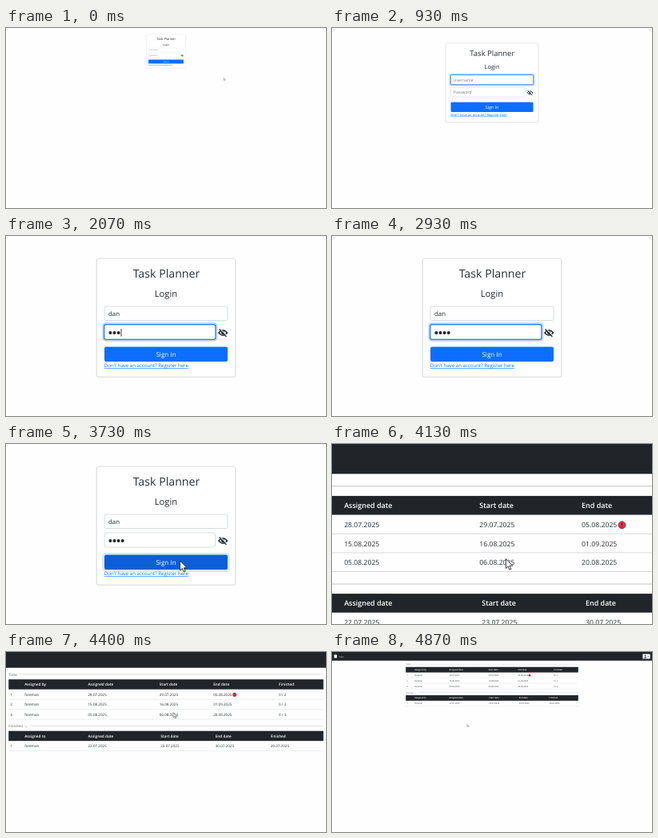
An HTML page for the animation above (4940 ms loop, 400 by 225 pixels).

```html
<!DOCTYPE html>
<html lang="en">
<head>
<meta charset="utf-8">
<title>Task planner login</title>
<style>
  html, body { margin: 0; width: 100%; height: 100%; overflow: hidden; background: #fefefe; }
  svg { display: block; width: 100%; height: 100%; }
  text { font-family: "Open Sans", "Noto Sans", sans-serif; font-size: 8.8px; fill: #2b2f33; }
  .mid { text-anchor: middle; }
  .hint { font-size: 7.6px; fill: #6c757d; }
  .typed { font-size: 7.9px; fill: #212529; }
  .head { font-weight: 600; font-size: 9.1px; fill: #fff; }
  .legend { font-size: 8.6px; fill: #6a6d70; }
  .field { fill: #fff; stroke: #ced4da; stroke-width: .8; }
  .glow { fill: none; stroke: #0d6efd; stroke-opacity: .25; stroke-width: 2.6; }
  .edge { fill: none; stroke: #2a7fdf; stroke-width: 1.2; }
</style>
</head>
<body>
<svg viewBox="0 0 400 225" text-rendering="geometricPrecision">
  <rect width="400" height="225" fill="#fefefe"/>
  <g id="camera">
    <g id="login">
      <rect x="112.2" y="28" width="175.6" height="149.6" rx="4" fill="#000" opacity=".05"/>
      <rect x="113.3" y="28" width="173.4" height="148" rx="3" fill="#fff" stroke="#d9dcdf" stroke-width=".9"/>
      <text class="mid" x="200.5" y="52" style="font-size:14.2px">Task Planner</text>
      <text class="mid" x="200" y="75.8" style="font-size:11.2px">Login</text>
      <rect class="field" x="123" y="88" width="154" height="17.5" rx="2"/>
      <rect class="field" x="123" y="111" width="138.5" height="18" rx="2"/>
      <g id="focus">
        <rect class="glow" x="121.3" rx="3.4"/>
        <rect class="edge" x="122.6" rx="2.3"/>
      </g>
      <text id="userHint" class="hint" x="128" y="99.6">Username</text>
      <text id="user" class="typed" x="128" y="99.6"></text>
      <text id="passHint" class="hint" x="128" y="122.8">Password</text>
      <g id="dots" fill="#212529"></g>
      <rect id="caret" width=".8" height="9.6" fill="#111"/>
      <g fill="none" stroke="#24282c">
        <path d="M265.9 121q5.3 -6.4 10.6 0q-5.3 6.4 -10.6 0z" stroke-width="1.4"/>
        <circle cx="271.2" cy="121" r="1.7" fill="#24282c"/>
        <path d="M267.6 116.2l8.6 9.3" stroke="#fff" stroke-width="1.6"/>
        <path d="M266.6 116.4l8.8 9.4" stroke-width="1.4"/>
      </g>
      <rect id="ring" class="glow" x="121.6" y="137.2" width="156.8" height="21.2" rx="3.4"/>
      <rect id="button" x="123" y="138.6" width="154" height="18.4" rx="2"/>
      <text class="mid" x="200" y="150.7" style="font-size:8.1px;fill:#fff">Sign In</text>
      <text x="122.8" y="164" style="font-size:6.1px;fill:#0d6efd;text-decoration:underline">Don't have an account? Register here</text>
    </g>
    <g id="board"></g>
    <path id="arrow" d="M0 0V12L2.8 9.5L4.7 13.8L6.6 13L4.7 8.8H8.6Z" fill="#fff" stroke="#222" stroke-width=".9" stroke-linejoin="round"/>
    <path id="beam" d="M-2 -6.5H2M-2 6.5H2M0 -6.5V6.5" fill="none" stroke="#333" stroke-width="1"/>
  </g>
</svg>
<script>
const LOOP = 4940, ZOOM = 3.52;
const SWITCH = 4065, PASS_FOCUS = 1725, CLICK = 3260;
const NAME = "dan", NAME_KEYS = [1190, 1262, 1395];
const PASS_KEYS = [1865, 1925, 2065, 2195];
const $ = id => document.getElementById(id);
const show = (id, on) => $(id).setAttribute("display", on ? "inline" : "none");
const clamp = v => Math.max(0, Math.min(1, v));
const ease = u => u < .5 ? 4 * u ** 3 : 1 - 4 * (1 - u) ** 3;
const span = (t, from, to) => ease(clamp((t - from) / (to - from)));
const mix = (a, b, p) => a + (b - a) * p;
const count = (keys, t) => keys.filter(k => k <= t).length;

// Dashboard
const LEFT = -179.4, RIGHT = 579.4;
const label = (x, y, s, cls = "") => `<text x="${x}" y="${y}" class="${cls}">${s}</text>`;
const rule = (x, y, color) => `<path d="M${x} ${y}H${RIGHT}" stroke="${color}" stroke-width=".9"/>`;

function table(top, cols, heads, rows) {
  let out = `<rect x="${LEFT}" y="${top}" width="${RIGHT - LEFT}" height="24" fill="#212529"/>`;
  heads.forEach((h, i) => out += label(cols[i + 1], top + 15.6, h, "head"));
  rows.forEach((row, r) => {
    const y = top + 24 * (r + 1);
    row.forEach((cell, i) => out += label(cols[i], y + 15.7, cell));
    out += rule(LEFT, y + 24.2, "#d5d8db");
  });
  return out;
}

const nav = `
  <rect x="-510" y="-2" width="1420" height="40" fill="#212529"/>
  <g transform="translate(${200 - 200 * ZOOM}) scale(${ZOOM})">
    <rect x="2.7" y="3.8" width="3.4" height="3.6" rx=".4" fill="#fff"/>
    <path d="M3.4 3.8v-.7h2v.7" fill="none" stroke="#fff" stroke-width=".5"/>
    <text x="8.9" y="6.5" style="font-size:2.5px;fill:#fff">Todo</text>
    <rect x="388.3" y="2.4" width="9.4" height="6.2" rx=".8" fill="#f8f9fa"/>
    <circle cx="391.6" cy="4.6" r=".9" fill="#212529"/>
    <path d="M389.9 7.4q1.7 -3 3.4 0z" fill="#212529"/>
    <path d="M394.5 5.2h1.8l-.9 1z" fill="#212529"/>
  </g>`;

const alertMark = `
  <circle cx="365.2" cy="103" r="4.5" fill="#dc3545" stroke="#b51a34" stroke-width=".9"/>
  <path d="M365.2 100.4v3M365.2 104.6v1" stroke="#5e1020" stroke-width="1.2"/>`;

$("board").innerHTML = nav
  + label(LEFT, 57.6, "Tasks", "legend") + rule(-154, 53.6, "#b9bcbf")
  + table(66, [-175.6, -141, 12, 184, 314, 472],
    ["Assigned by", "Assigned date", "Start date", "End date", "Finished"], [
      [1, "foreman", "28.07.2025", "29.07.2025", "05.08.2025", "0 / 2"],
      [2, "foreman", "15.08.2025", "16.08.2025", "01.09.2025", "0 / 2"],
      [3, "foreman", "05.08.2025", "06.08.2025", "20.08.2025", "0 / 3"]])
  + alertMark
  + label(LEFT, 182, "Finished", "legend") + rule(-127, 178, "#b9bcbf")
  + `<path d="M-139.5 178.6l2.8 2.4l2.8 -2.4" fill="none" stroke="#6a6d70" stroke-width=".9"/>`
  + table(190.3, [-175.6, -141, 12, 187, 319, 452],
    ["Assigned to", "Assigned date", "Start date", "End date", "Finished"], [
      [1, "foreman", "22.07.2025", "23.07.2025", "30.07.2025", "29.07.2025"]]);

$("dots").innerHTML = PASS_KEYS.map((_, i) =>
  `<circle cx="${130.4 + 5.1 * i}" cy="121" r="2"/>`).join("");

// Pointer stops, in fully zoomed coordinates
const MOVES = [
  [70, 470, 453.4, 218, 222, 97],
  [2960, 3230, 222, 97, 217.6, 146],
  [4450, 4860, 217.6, 146, 90, 317]
];

function pointerAt(t) {
  const m = MOVES.filter(v => v[0] <= t).pop() || MOVES[0];
  const p = span(t, m[0], m[1]);
  return [mix(m[2], m[4], p), mix(m[3], m[5], p)];
}

function drawFocus(t) {
  const inPass = t >= PASS_FOCUS;
  show("focus", t >= 400 && t < CLICK);
  const [y, w, h] = inPass ? [111, 138.5, 18] : [88, 154, 17.5];
  [...$("focus").children].forEach((r, i) => {
    const pad = i ? .4 : 1.7;
    r.setAttribute("y", y - pad);
    r.setAttribute("width", w + 2 * pad);
    r.setAttribute("height", h + 2 * pad);
  });
}

function drawCaret(t, typed, dots) {
  const inPass = t >= PASS_FOCUS;
  const last = [400, ...NAME_KEYS, PASS_FOCUS, ...PASS_KEYS].filter(k => k <= t).pop();
  show("caret", t >= 400 && t < CLICK && (t - last) % 1000 < 500);
  const x = inPass ? 128 + 5.1 * dots : 128 + (typed ? $("user").getComputedTextLength() : 0);
  $("caret").setAttribute("x", x + .3);
  $("caret").setAttribute("y", inPass ? 116 : 91.8);
}

function drawPointer(t) {
  const [x, y] = pointerAt(t);
  const hidden = t > 620 && t < 2960;
  const overField = t < SWITCH && x > 123 && x < 277 && (y > 88 && y < 105.5 || y > 111 && y < 129);
  show("arrow", !hidden && !overField);
  show("beam", !hidden && overField);
  for (const id of ["arrow", "beam"]) $(id).setAttribute("transform", `translate(${x} ${y})`);
  $("button").setAttribute("fill", t < SWITCH && y > 138 && y < 157 && x < 277 ? "#0b5ed7" : "#0d6efd");
}

function draw(t) {
  const zoom = mix(1, ZOOM, span(t, 572, 1272) - span(t, 4005, 4705)) / ZOOM;
  $("camera").setAttribute("transform", `translate(${200 - 200 * zoom}) scale(${zoom})`);
  show("login", t < SWITCH);
  show("board", t >= SWITCH);

  const typed = count(NAME_KEYS, t), dots = count(PASS_KEYS, t);
  $("user").textContent = NAME.slice(0, typed);
  show("userHint", !typed);
  show("passHint", !dots);
  [...$("dots").children].forEach((d, i) => d.setAttribute("display", i < dots ? "inline" : "none"));
  $("ring").setAttribute("opacity", t < CLICK ? 0 : 1 - span(t, 3600, 3900));

  drawFocus(t);
  drawCaret(t, typed, dots);
  drawPointer(t);
}

const start = performance.now();
function tick() {
  draw((performance.now() - start) % LOOP);
  requestAnimationFrame(tick);
}
tick();
</script>
</body>
</html>
```
